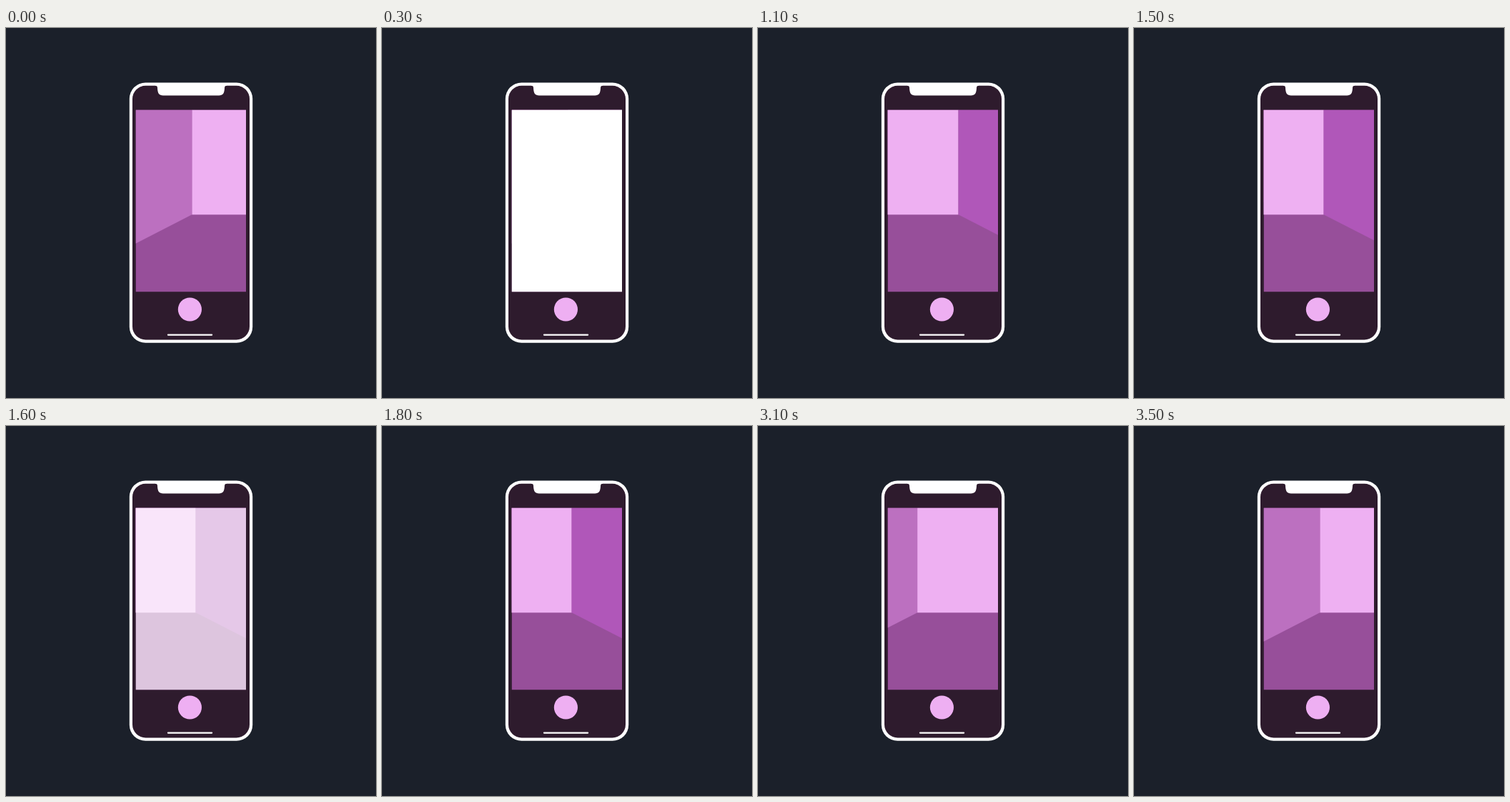
Animation of 518x518 px, one loop 4100 ms. Source, as an HTML page with a canvas:

```html
<!DOCTYPE html>
<html lang="en">
<head>
<meta charset="utf-8">
<title>Phone camera</title>
<style>
  html, body { margin: 0; width: 100%; height: 100%; overflow: hidden; background: #1b202a; }
  canvas { display: block; width: 518px; height: 518px; }
</style>
</head>
<body>
<canvas id="stage"></canvas>
<script>
const LOOP = 4100, STEP = 100;
const VIEW = { l: 181.5, t: 114.5, r: 336, b: 369.5 };
const HORIZON = 261.3, SLOPE = 0.512;
const CORNER = 260.3, ROOM = 118.3, PAN = 113;

const canvas = document.getElementById('stage');
const ctx = canvas.getContext('2d');
const ratio = window.devicePixelRatio || 1;
canvas.width = canvas.height = Math.round(518 * ratio);

const clamp = v => Math.max(0, Math.min(1, v));

// Cubic bezier (.7, 0, .3, 1), solved by bisection.
function ease(p) {
  p = clamp(p);
  let lo = 0, hi = 1;
  for (let i = 0; i < 24; i++) {
    const s = (lo + hi) / 2;
    if (2.1 * s - 3.3 * s * s + 2.2 * s ** 3 < p) lo = s; else hi = s;
  }
  return lo * lo * (3 - 2 * lo);
}

function rect(l, t, r, b, color) {
  ctx.fillStyle = color;
  ctx.fillRect(l, t, r - l, b - t);
}

function poly(color, ...points) {
  ctx.fillStyle = color;
  ctx.beginPath();
  points.forEach(([x, y]) => ctx.lineTo(x, y));
  ctx.fill();
}

function rounded(x, y, w, h, radius, color) {
  ctx.fillStyle = color;
  ctx.beginPath();
  ctx.roundRect(x, y, w, h, radius);
  ctx.fill();
}

function drawBody() {
  rounded(172.8, 76.5, 172.4, 364.3, 22.5, '#fff');
  rounded(177, 80.8, 164, 355.7, 18.5, '#2e1b2d');

  ctx.fillStyle = '#fff';
  ctx.beginPath();
  ctx.moveTo(209, 79);
  ctx.lineTo(209, 80.8);
  ctx.quadraticCurveTo(212, 80.8, 212, 84);
  ctx.bezierCurveTo(212.3, 91, 214, 94.5, 220, 94.5);
  ctx.lineTo(298, 94.5);
  ctx.bezierCurveTo(304, 94.5, 305.7, 91, 306, 84);
  ctx.quadraticCurveTo(306, 80.8, 309, 80.8);
  ctx.lineTo(309, 79);
  ctx.fill();

  ctx.fillStyle = '#eeaff2';
  ctx.beginPath();
  ctx.arc(257.4, 394, 16.6, 0, Math.PI * 2);
  ctx.fill();

  rounded(225.8, 428.4, 63.4, 2.3, 1.1, '#fff');
}

function drawRoom(shift, flash) {
  const { l, t, r, b } = VIEW;
  const left = CORNER - shift, right = left + ROOM;
  ctx.save();
  ctx.beginPath();
  ctx.rect(l, t, r - l, b - t);
  ctx.clip();
  rect(l, t, r, b, '#974f9a');
  rect(left, t, right, HORIZON, '#eeb0f2');
  poly('#bc70c0', [l, t], [left, t], [left, HORIZON], [l, HORIZON + (left - l) * SLOPE]);
  poly('#b057b9', [r, t], [right, t], [right, HORIZON], [r, HORIZON + (r - right) * SLOPE]);
  if (flash > 0) rect(l, t, r, b, `rgba(255,255,255,${flash})`);
  ctx.restore();
}

const pulse = (t, peak) => clamp(1 - Math.abs(t - peak) / 100);

function draw(now) {
  const t = Math.floor((now % LOOP) / STEP) * STEP;
  const pan = ease((t - 500) / 900) - ease((t - 2600) / 900);
  const flash = pulse(t, 300) + pulse(t, 1633);
  ctx.setTransform(ratio, 0, 0, ratio, 0, 0);
  rect(0, 0, 518, 518, '#1b202a');
  drawBody();
  drawRoom(PAN * pan, flash);
}

const start = performance.now();
function tick() {
  draw(performance.now() - start);
  requestAnimationFrame(tick);
}
tick();
</script>
</body>
</html>
```
